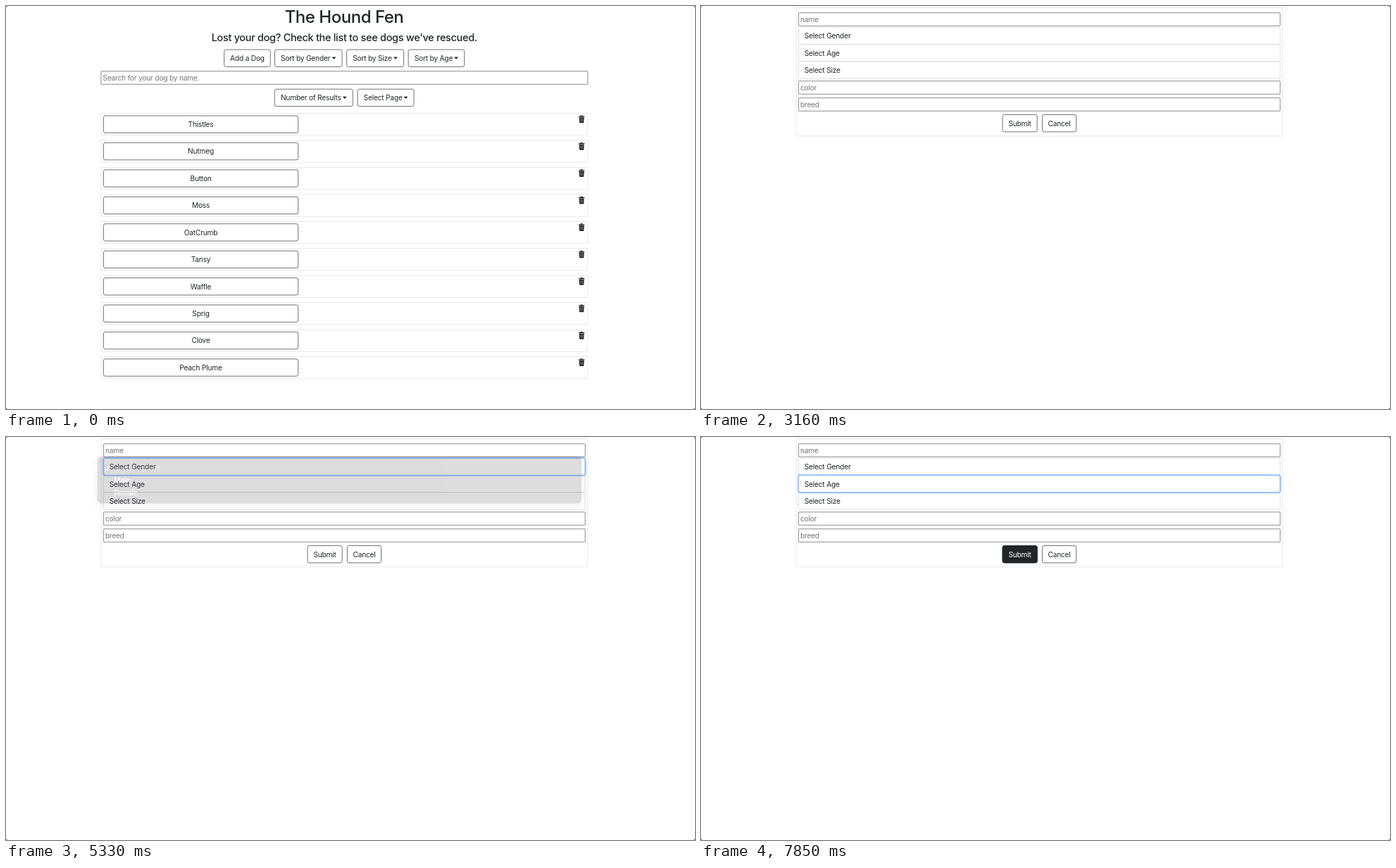
These frames come from a looping animation (978x573 px, 8 s). An HTML page:

```html
<!DOCTYPE html>
<html lang="en">
<head>
<meta charset="utf-8">
<title>Dog shelter list</title>
<style>
  html, body { margin: 0; width: 100%; height: 100%; overflow: hidden; background: #fff; }
  svg { display: block; width: 978px; height: 573px; }
  text { font: 10.2px Inter, "Open Sans", sans-serif; letter-spacing: -.02em; fill: #212529; white-space: pre; }
  .mid { text-anchor: middle; }
  .title { font-size: 24px; font-weight: 500; }
  .lead { font-size: 14.45px; font-weight: 500; }
  .fact { font-size: 16.8px; font-weight: 500; }
  .hint { fill: #757575; }
  .option { fill: #fff; font-size: 9.8px; font-weight: 500; }
  .chosen { fill: #b0afb3; }
  .link { fill: #0d6efd; text-decoration: underline; }
  .link.hot { fill: #0a4aa8; }
  .card { fill: #fff; stroke: #e3e3e3; stroke-width: .8; }
  .button { fill: #fff; stroke: #55595d; stroke-width: .85; }
  .dark .button { fill: #212529; stroke: #212529; }
  .dark text { fill: #fff; }
  .ring { fill: none; stroke: #212529; stroke-opacity: .5; stroke-width: 2.7; }
  .input { fill: #fff; stroke: #a3a3a3; stroke-width: 1.3; }
  .input.hot { fill: none; stroke: #666; }
  .select { fill: #fff; stroke: #d3d7db; stroke-width: .8; }
  .halo { fill: none; stroke: #0d6efd; stroke-opacity: .25; stroke-width: 2.6; }
  .edge { fill: none; stroke: #86b7fe; stroke-width: .9; }
  .ink { fill: none; stroke: #1a1a1a; stroke-width: 1.1; stroke-linecap: round; stroke-linejoin: round; }
  .dog { stroke: #151515; stroke-width: 1.6; stroke-linejoin: round; stroke-linecap: round; fill: #fff; }
  .dog .brown { fill: #8b4c17; }
  .dog .line { fill: none; stroke-width: .9; }
</style>
</head>
<body>
<svg id="stage" viewBox="0 0 978 573" xmlns="http://www.w3.org/2000/svg">
  <defs>
    <filter id="soft" x="-5%" y="-30%" width="110%" height="160%"><feGaussianBlur stdDeviation="3.5"/></filter>
    <radialGradient id="noseShine" cx=".4" cy=".3" r=".6">
      <stop offset="0" stop-color="#777"/><stop offset=".6" stop-color="#222"/><stop offset="1" stop-color="#050505"/>
    </radialGradient>
    <linearGradient id="furShade"><stop offset=".4" stop-color="#fff"/><stop offset="1" stop-color="#dcdcdc"/></linearGradient>
    <g id="trash">
      <path d="M-4.2-4.4h2.3l.7-1h2.4l.7 1h2.3v1.2h-8.4z" fill="#222"/>
      <path d="M-3.6-2.7h7.2l-.4 7q-.1 1-1 1h-4.4q-.9 0-1-1z" fill="#222"/>
      <path d="M-1.7-1.3v5M0-1.3v5M1.7-1.3v5" stroke="#aaa" stroke-width=".6"/>
    </g>
    <g id="edit" class="ink">
      <path d="M1-4.2h-4.2q-1.2 0-1.2 1.2v6.2q0 1.2 1.2 1.2h6.2q1.2 0 1.2-1.2v-3.4" stroke-width=".9"/>
      <path d="M-1.8 1.9l.4-1.9 4.6-4.6 1.5 1.5-4.6 4.6z" stroke-width=".9"/>
    </g>
    <g id="dog" class="dog">
      <path d="M654 123C664 123 667 113 660 98C670 106 672 127 657 133Z"/>
      <path d="M620 92C619 104 616 116 613 126Q604 128 605 138H658Q663 124 656 111C650 101 641 94 632 88Z" fill="url(#furShade)"/>
      <path class="brown" d="M630 91C639 95 652 103 656 112Q645 113 640 107Q635 100 630 91Z" stroke-width=".6"/>
      <path d="M605 139Q603 126 614 126Q621 128 619 139ZM619 139Q617 126 628 126Q635 129 633 139ZM640 139Q639 128 651 129Q660 130 658 139Z" stroke-width="1.2"/>
      <path class="line" d="M622 109Q619 118 621 126M632 112Q629 120 631 128M641 137Q634 125 647 118M609 134v4M613 134v4M623 134v4M628 134v4M646 135v3M651 135v3"/>
      <path d="M594 47C600 36 625 35 637 46C644 62 638 78 622 89C608 101 590 102 579 92C573 86 573 78 576 72C584 65 591 59 594 47Z"/>
      <path class="brown" d="M591 51C589 42 592 34 599 33C606 31 613 35 616 39C606 39 598 43 591 51Z"/>
      <path class="brown" d="M624 47C632 42 645 41 648 46C647 54 650 66 644 73C635 72 629 65 628 53Z"/>
      <ellipse cx="600" cy="55" rx="6.5" ry="7.3" stroke-width="1"/>
      <ellipse cx="613.5" cy="57" rx="8" ry="8.5" stroke-width="1"/>
      <path d="M600 54.8h.1M613.5 57h.1" stroke-width="4.6"/>
      <path class="line" d="M595 47q4-4 8-1M608 46q6-4 11 0M582 93C599 98 615 94 621 82M618 80q4 1 4 4M599 78h.1M603 82h.1M598 84h.1"/>
      <ellipse cx="585.5" cy="72" rx="11.7" ry="10.6" fill="url(#noseShine)"/>
      <path d="M617 94Q626 94 631 89" fill="none" stroke="#8e2018" stroke-width="4"/>
      <circle cx="619.5" cy="100.5" r="3.3" fill="#e3a52e" stroke-width=".8"/>
    </g>
  </defs>
</svg>
<script>
const LOOP = 8000;
const rules = [];

// Wraps content in a group whose opacity is held at each listed time (ms).
function timed(steps, content) {
  const name = 'step' + rules.length;
  const frames = Object.entries({ 0: 0, ...steps })
    .map(([ms, value]) => `${ms / LOOP * 100}%{opacity:${value}}`).join('');
  rules.push(`@keyframes ${name}{${frames}}`);
  return `<g style="opacity:0;animation:${name} ${LOOP}ms step-end infinite">${content}</g>`;
}

const rect = (cls, x, y, w, h, r = 0) =>
  `<rect class="${cls}" x="${x}" y="${y}" width="${w}" height="${h}" rx="${r}"/>`;
const text = (cls, x, baseline, label) =>
  `<text class="${cls}" x="${x}" y="${baseline}">${label}</text>`;
const use = (id, x, y) => `<use href="#${id}" x="${x}" y="${y}"/>`;

const button = (x, y, w, label) =>
  rect('button', x, y, w, 24.4, 2.6) + text('mid', x + w / 2, y + 16, label);
const darkButton = (...args) => `<g class="dark">${button(...args)}</g>`;
const focusRing = (x, y, w) => rect('ring', x - 1.4, y - 1.4, w + 2.8, 27.2, 4);

function dropButton(x, y, w, label) {
  const tip = x + w - 11.6;
  return rect('button', x, y, w, 24.4, 2.6) + text('', x + 8.6, y + 16, label) +
    `<path d="M${tip - 3} ${y + 10.6}h6l-3 3.1z" fill="#212529"/>`;
}

const input = (x, y, w, hint) =>
  rect('input', x, y, w, 18.6, 1.2) + text('hint', x + 2.4, y + 13, hint);

// List page
const names = ['Thistles', 'Nutmeg', 'Button', 'Moss', 'OatCrumb',
  'Tansy', 'Waffle', 'Sprig', 'Clove', 'Peach Plume'];
const dogRow = (name, i) => {
  const y = 152.6 + i * 38.43;
  return rect('card', 134.9, y, 690.9, 31.3) + button(138.4, y + 3.4, 276.3, name) + use('trash', 817, y + 8.3);
};
const firstDog = [138.4, 156, 276.3, names[0]];
const addDog = [309.7, 62, 65.6, 'Add a Dog'];

const listPage =
  text('title mid', 480, 24, 'The Hound Fen') +
  text('lead mid', 480.3, 50, "Lost your dog? Check the list to see dogs we've rescued.") +
  button(...addDog) +
  dropButton(381.5, 62, 95.6, 'Sort by Gender') +
  dropButton(483.6, 62, 81, 'Sort by Size') +
  dropButton(571.1, 62, 79.5, 'Sort by Age') +
  input(134.9, 92.7, 690.9, 'Search for your dog by name.') +
  dropButton(381.3, 118.2, 111, 'Number of Results') +
  dropButton(499, 118.2, 80, 'Select Page') +
  names.map(dogRow).join('') +
  timed({ 780: .35, 850: .75, 920: 1, 990: 0 }, focusRing(...firstDog)) +
  timed({ 500: .35, 570: .8, 640: 1, 990: 0 }, darkButton(...firstDog)) +
  timed({ 2670: 1, 2740: 0 }, rect('input hot', 134.9, 92.7, 690.9, 18.6, 1.2)) +
  timed({ 3090: .5, 3160: 0 }, focusRing(...addDog)) +
  timed({ 2810: .35, 2880: .8, 2950: 1, 3160: 0 }, darkButton(...addDog));

// Detail page: label and the place of its edit icon
const facts = [['Name: ' + names[0], 400], ['Gender: male', 387.5], ['Age: senior', 371],
  ['Size: medium', 388], ['Color: black', 376], ['Breed: westie/corgi', 434.3]];
const detailPage =
  rect('card', 273.5, 2.5, 413.8, 167) +
  facts.map(([label, iconX], i) =>
    text('fact', 276.8, 23.6 + i * 26.6, label) + use('edit', iconX, 11.7 + i * 26.6)).join('') +
  use('dog', 0, 0) +
  text('link mid', 480.3, 182, 'BACK') +
  timed({ 1760: 1, 1970: 0 }, text('link hot mid', 480.3, 182, 'BACK'));

// Form page
const select = (y, label) => rect('select', 138.5, y, 683.6, 24.2, 2.6) + text('', 146.7, y + 16, label);
const glow = y => rect('halo', 137.9, y - .6, 684.8, 25.4, 3.2) + rect('edge', 138.5, y, 683.6, 24.2, 2.6);

function menu(y, options) {
  const h = options.length * 18.2 + 11.2;
  const first = y + 14.8;
  const items = options.map((label, i) =>
    text(i ? 'option' : 'chosen', 153.6, first + i * 18.2 + 3.6, label)).join('');
  return `<rect x="125" y="${y + 1}" width="696" height="${h + 5}" rx="8" fill="#000" opacity=".16" filter="url(#soft)"/>` +
    rect('', 130, y, 686.3, h, 5).replace('<rect', '<rect fill="#666569" stroke="#535257" stroke-width=".7"') +
    `<path class="ink" d="M140.7 ${first + 1.4}l2.4 3.2 5-7.6" style="stroke:#b0afb3;stroke-width:1.7"/>` + items;
}
const highlight = (y, label) =>
  `<rect x="135" y="${y}" width="677" height="18.2" rx="3" fill="#2f6bd3"/>` + text('option', 153.6, y + 12.7, label);

const submit = [428, 154.5, 49.2, 'Submit'];
const formPage =
  rect('card', 135.1, 2.5, 690.7, 182.3) +
  input(138.5, 9.6, 683.6, 'name') +
  select(30.2, 'Select Gender') +
  select(54.5, 'Select Age') +
  select(78.9, 'Select Size') +
  input(138.5, 106.7, 683.6, 'color') +
  input(138.5, 130.7, 683.6, 'breed') +
  button(...submit) +
  button(484.4, 154.5, 48.2, 'Cancel') +
  timed({ 4280: .3, 4350: .75, 4420: 1, 6100: .6, 6170: .2, 6240: 0 }, glow(30.2)) +
  timed({ 6100: .2, 6170: .7, 6240: 1 }, glow(54.5)) +
  timed({ 7710: 1, 7780: 0 }, rect('input hot', 138.5, 130.7, 683.6, 18.6, 1.2)) +
  timed({ 7780: .6, 7850: 1 }, darkButton(...submit)) +
  timed({ 4280: 1, 5120: .95, 5190: .8, 5260: .5, 5330: .22, 5400: 0 },
    menu(28.2, ['Select Gender', 'Male', 'Female'])) +
  timed({ 4700: 1, 4770: 0 }, highlight(52.2, 'Male')) +
  timed({ 6100: 1, 6730: .82, 6800: .5, 6870: .22, 6940: 0 },
    menu(52.4, ['Select Age', 'Puppy', 'Adult', 'Senior'])) +
  timed({ 6380: 1, 6450: 0 }, highlight(112.6, 'Senior'));

const corners = '<path d="M0 0h2L0 2zM978 0v2l-2-2zM0 573v-2l2 2zM978 573h-2l2-2z" fill="#777"/>';

document.getElementById('stage').insertAdjacentHTML('beforeend',
  timed({ 0: 1, 990: 0, 1970: 1, 3160: 0 }, listPage) +
  timed({ 990: 1, 1970: 0 }, detailPage) +
  timed({ 3160: 1 }, formPage) + corners);
document.head.insertAdjacentHTML('beforeend', `<style>${rules.join('\n')}</style>`);
</script>
</body>
</html>
```
